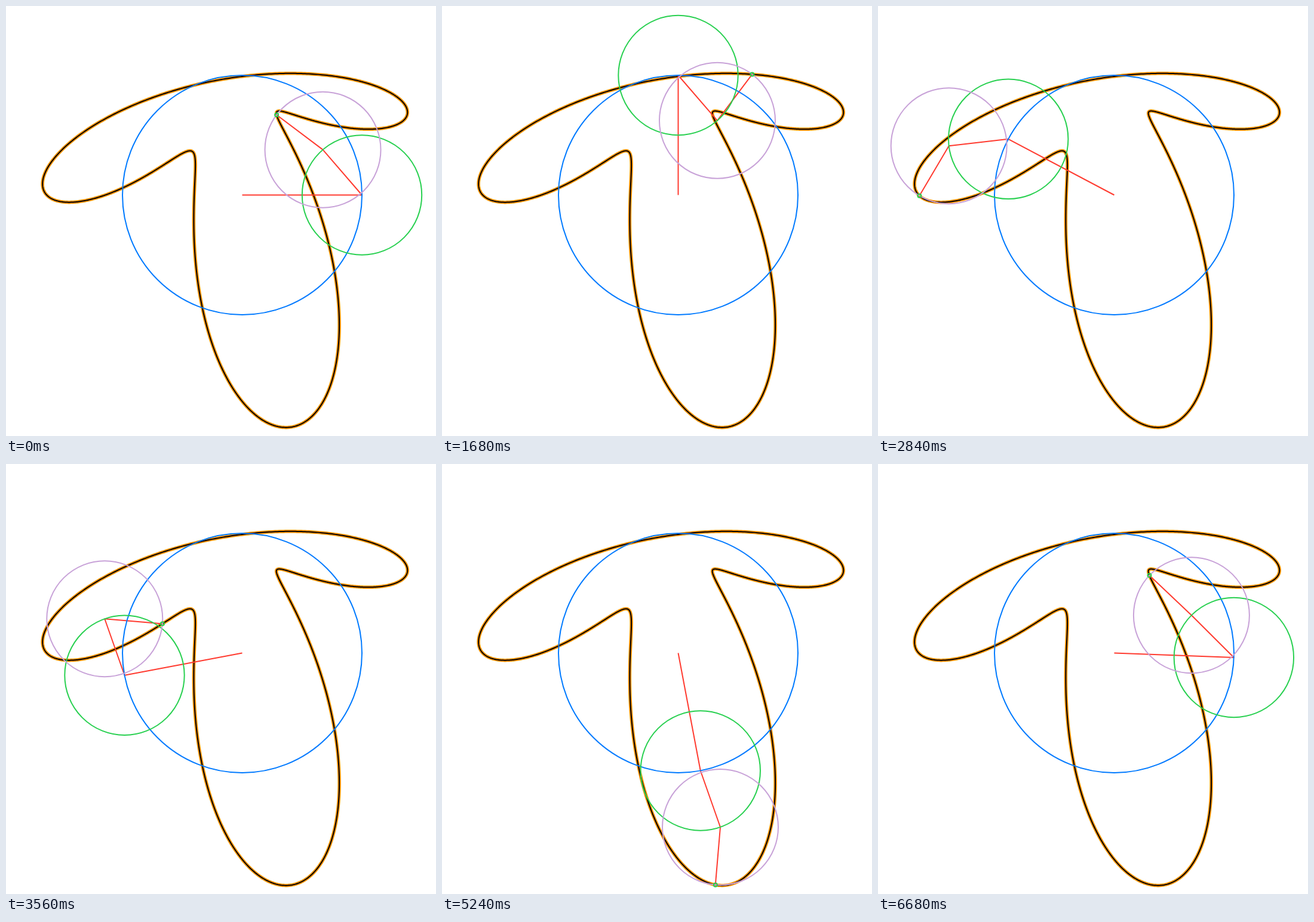
Animation of 720 by 720 pixels, one loop 6720 ms. Source, as an HTML page with a canvas:

```html
<!DOCTYPE html>
<html lang="en">
<head>
<meta charset="utf-8">
<title>Epicycles</title>
<style>
  html, body { margin: 0; width: 100%; height: 100%; overflow: hidden; background: #fff; }
  canvas { display: block; width: 720px; height: 720px; }
</style>
</head>
<body>
<canvas id="stage" width="720" height="720"></canvas>
<script>
const ctx = document.getElementById('stage').getContext('2d');
const LOOP = 6720, STEP = 40, TAU = Math.PI * 2;
const CENTER = { x: 395.5, y: 316.5 };

// Each arm turns freq times per loop, starting at phase (degrees, counterclockwise).
const ARMS = [
  { r: 200.5, freq: 1, phase: 0, color: '#007aff' },
  { r: 100.2, freq: -2, phase: 130.8, color: '#28d050' },
  { r: 97, freq: 3, phase: 143, color: '#c8a2d8' }
];
const TIP = { r: 3, color: '#28d050' };

// Joints of the arm chain, from the fixed center to the tip.
function joints(angle) {
  const points = [CENTER];
  for (const { r, freq, phase } of ARMS) {
    const last = points[points.length - 1];
    const a = freq * angle + phase * TAU / 360;
    points.push({ x: last.x + r * Math.cos(a), y: last.y - r * Math.sin(a) });
  }
  return points;
}

function traceCurve(count) {
  const path = new Path2D();
  for (let i = 0; i < count; i++) {
    const tip = joints(i / count * TAU)[ARMS.length];
    path.lineTo(tip.x, tip.y);
  }
  path.closePath();
  return path;
}

function stroke(path, color, width) {
  ctx.strokeStyle = color;
  ctx.lineWidth = width;
  ctx.stroke(path);
}

function ring(center, r, color) {
  const path = new Path2D();
  path.arc(center.x, center.y, r, 0, TAU);
  stroke(path, color, 2);
}

const curve = traceCurve(1200);
ctx.lineJoin = 'round';

function draw(time) {
  const angle = Math.floor(time % LOOP / STEP) * STEP / LOOP * TAU;
  const points = joints(angle);

  ctx.fillStyle = '#fff';
  ctx.fillRect(0, 0, 720, 720);
  stroke(curve, '#ff9500', 5.5);
  stroke(curve, '#000', 2);

  const chain = new Path2D();
  points.forEach(p => chain.lineTo(p.x, p.y));
  stroke(chain, '#ff3b30', 2);

  ARMS.forEach((arm, i) => ring(points[i], arm.r, arm.color));
  ring(points[ARMS.length], TIP.r, TIP.color);
}

const start = performance.now();
function tick() {
  draw(performance.now() - start);
  requestAnimationFrame(tick);
}
tick();
</script>
</body>
</html>
```
